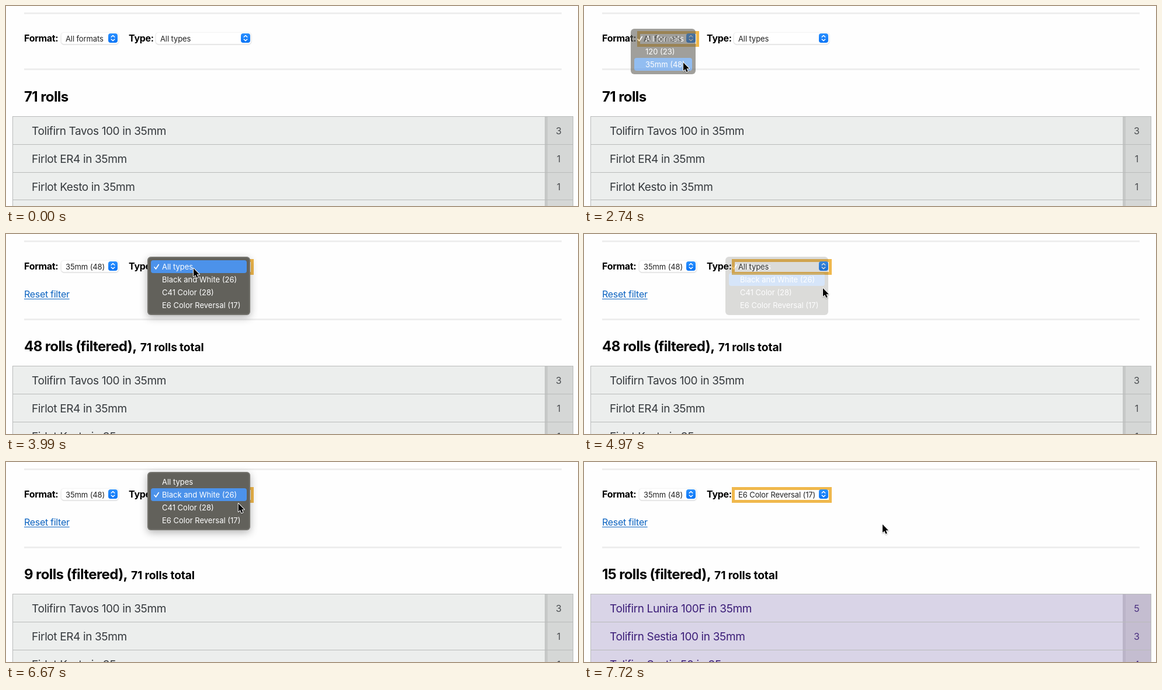
An HTML page with a canvas for the animation above (8000 ms loop, 979 by 343 pixels).

```html
<!DOCTYPE html>
<html lang="en">
<head>
<meta charset="utf-8">
<title>Film roll filter</title>
<style>
html, body { margin: 0; width: 100%; height: 100%; overflow: hidden; background: #fefefe; }
canvas { display: block; }
</style>
</head>
<body>
<canvas id="stage" width="979" height="343"></canvas>
<script>
const stage = document.getElementById('stage');
const screen2d = stage.getContext('2d');
const layer = document.createElement('canvas');
layer.width = stage.width;
layer.height = stage.height;
const layer2d = layer.getContext('2d');
let ctx = screen2d;
const LOOP = 8000;

const formats = ['All formats', '120 (23)', '35mm (48)'];
const types = ['All types', 'Black and White (26)', 'C41 Color (28)', 'E6 Color Reversal (17)'];
const greyList = {
  fill: '#eceeed', count: '#d5d7d6', edge: '#c6c8c7', ink: '#35393d', num: '#4a4d50',
  rows: [['Tolifirn Tavos 100 in 35mm', 3], ['Firlot ER4 in 35mm', 1], ['Firlot Kesto in 35mm', 1], ['', '']]
};
const purpleList = {
  fill: '#d9d4e7', count: '#c4bdd0', edge: '#bbb4c8', ink: '#3b1d78', num: '#4a2f80',
  rows: [['Tolifirn Lunira 100F in 35mm', 5], ['Tolifirn Sestia 100 in 35mm', 3], ['Tolifirn Sestia 50 in 35mm', 4]]
};

// Pointer moves: start, last step, steps, end x, end y, ease-out power
const moves = [
  [360, 530, 3, 683, 135, 1],
  [790, 1370, 8, 157, 58, 2],
  [1900, 2330, 6, 170, 97, 2],
  [2830, 2920, 2, 283, 90, 1],
  [3370, 3720, 5, 321, 59, 2],
  [4260, 4520, 4, 385, 71, 2],
  [4880, 4970, 2, 409, 93, 1],
  [5060, 5150, 2, 427, 97, 1],
  [5690, 6230, 7, 396, 56, 2],
  [6670, 7110, 6, 400, 92, 3],
  [7460, 7720, 4, 511, 107, 2]
];

// Menus: open, blink, lit again, then fade steps
const menus = [
  { items: formats, x: 80, y: 39, w: 111, checked: 0, pick: 2,
    open: 1630, off: 2570, on: 2655, fade: [[2740, .6], [2830, .22], [2920, 0]] },
  { items: types, x: 242, y: 39, w: 176, checked: 0, pick: 1,
    open: 3990, off: 4700, on: 4790, fade: [[4880, .6], [4970, .22], [5060, 0]] },
  { items: types, x: 242, y: 17, w: 176, checked: 1, pick: 3,
    open: 6410, off: 7280, on: 7370, fade: [[7460, .6], [7540, .22], [7630, 0]] }
];

function pointer(t) {
  let x = 1110, y = 82;
  for (const [t0, t1, n, ex, ey, pow] of moves) {
    if (t < t0) break;
    const step = Math.min(n, Math.floor((t - t0) / (t1 - t0) * (n - 1) + 1e-6) + 1);
    const k = 1 - Math.pow(1 - step / n, pow);
    x += (ex - x) * k;
    y += (ey - y) * k;
  }
  return { x, y };
}

function rect(x, y, w, h, color) {
  ctx.fillStyle = color;
  ctx.fillRect(x, y, w, h);
}

function round(x, y, w, h, r, color) {
  ctx.fillStyle = color;
  ctx.beginPath();
  ctx.roundRect(x, y, w, h, r);
  ctx.fill();
}

function shadow(color, blur, dy) {
  ctx.shadowColor = color;
  ctx.shadowBlur = blur;
  ctx.shadowOffsetY = dy;
}

function line(points, color, width) {
  ctx.strokeStyle = color;
  ctx.lineWidth = width;
  ctx.lineCap = ctx.lineJoin = 'round';
  ctx.beginPath();
  points.forEach(([x, y]) => ctx.lineTo(x, y));
  ctx.stroke();
}

function text(str, x, y, size, weight, color, spacing = 0, align = 'left') {
  ctx.font = `${weight} ${size}px Inter, Roboto, sans-serif`;
  ctx.letterSpacing = spacing + 'px';
  ctx.textAlign = align;
  ctx.fillStyle = color;
  ctx.fillText(str, x, y);
  return ctx.measureText(str).width;
}

function select(x, w, label, focused) {
  ctx.save();
  shadow('rgba(0,0,0,.28)', 2, .5);
  round(x + .5, 45.5, w - 1, 20, 5, '#fff');
  ctx.restore();
  if (focused) {
    rect(x - 3, 43, w + 7, 27, '#f0b84c');
    rect(x + 2, 48, w - 3, 17, '#fefefe');
  }
  text(label, x + 8, 61, 13, 400, '#222', -.1);
  const sx = x + w - 18;
  const blue = ctx.createLinearGradient(0, 47, 0, 63);
  blue.addColorStop(0, '#2a90ff');
  blue.addColorStop(1, '#0a74f5');
  round(sx, 47, 16, 16, 4, blue);
  const c = sx + 8;
  line([[c - 2.8, 53.3], [c, 50.5], [c + 2.8, 53.3]], '#fff', 1.5);
  line([[c - 2.8, 57], [c, 59.8], [c + 2.8, 57]], '#fff', 1.5);
}

function list(top, data) {
  const pitch = 47.75;
  data.rows.forEach(([name, num], i) => {
    const y = Math.round(top + i * pitch);
    rect(11, y, 960, 48, data.fill);
    rect(922, y, 49, 48, data.count);
    rect(922, y, 5, 48, data.edge);
    rect(11, y, 960, 1, '#b9bbba');
    text(name, 44, y + 32, 19, 400, data.ink, -.38);
    text(num, 946, y + 31, 16, 400, data.num, 0, 'center');
  });
  rect(11, top, 1, 343 - top, '#b9bbba');
  rect(970, top, 1, 343 - top, '#b9bbba');
}

function menuBody(m, t, solid) {
  const h = m.items.length * 22 + 12;
  ctx.save();
  if (solid) shadow('rgba(0,0,0,.3)', 14, 4);
  round(m.x, m.y, m.w, h, 6, '#62615b');
  ctx.restore();
  ctx.strokeStyle = '#85847f';
  ctx.lineWidth = 1;
  ctx.beginPath();
  ctx.roundRect(m.x + 1, m.y + 1, m.w - 2, h - 2, 5);
  if (solid) ctx.stroke();

  // The highlight trails the pointer by one step
  const row = Math.floor((pointer(t - 80).y - m.y - 6) / 22);
  const lit = t < m.off ? Math.max(row, 0) : t < m.on ? -1 : m.pick;
  if (lit >= 0) round(m.x + 6, m.y + 6 + lit * 22, m.w - 12, 22, 4, '#4c92ea');
  m.items.forEach((item, i) => text(item, m.x + 25, m.y + 22 + i * 22, 13, 400, '#fff'));
  const cy = m.y + 17 + m.checked * 22;
  line([[m.x + 12, cy + .8], [m.x + 14.5, cy + 4], [m.x + 19.3, cy - 3.5]], '#fff', 1.6);
}

// Drawn on its own layer so that the whole menu fades as one
function menu(m, t) {
  const fade = m.fade.filter(f => t >= f[0]).pop();
  const alpha = fade ? fade[1] : 1;
  if (t < m.open || !alpha) return;
  ctx = layer2d;
  ctx.clearRect(0, 0, layer.width, layer.height);
  menuBody(m, t, alpha === 1);
  ctx = screen2d;
  ctx.globalAlpha = alpha;
  ctx.drawImage(layer, 0, 0);
  ctx.globalAlpha = 1;
}

function arrow({ x, y }) {
  ctx.save();
  ctx.translate(x, y);
  ctx.beginPath();
  [[0, 0], [0, 14], [3.2, 11.2], [5.5, 16.3], [7.8, 15.3], [5.6, 10.3], [10, 10.3]]
    .forEach(([px, py]) => ctx.lineTo(px, py));
  ctx.closePath();
  shadow('rgba(0,0,0,.3)', 2, 1);
  ctx.lineJoin = 'round';
  ctx.lineWidth = 2;
  ctx.strokeStyle = '#fff';
  ctx.stroke();
  ctx.shadowColor = 'transparent';
  ctx.fillStyle = '#000';
  ctx.fill();
  ctx.restore();
}

function draw(t) {
  const filtered = t >= 3100;
  rect(0, 0, 979, 343, '#fefefe');
  rect(31, 11, 920, 3, '#eee');
  rect(31, filtered ? 145 : 107, 920, 3, '#eee');

  text('Format:', 31, 61, 16, 700, '#000', -.3);
  text('Type:', 210, 61, 16, 700, '#000', -.3);
  select(94, 99, formats[t >= 2920 ? 2 : 0], t >= 1630 && t < 3990);
  select(256, 164, types[t >= 7630 ? 3 : t >= 5060 ? 1 : 0], t >= 3990);

  if (filtered) {
    const w = text('Reset filter', 31, 109, 16, 400, '#0b63c0', -.3);
    rect(31, 111, w, 1, '#0b63c0');
    const count = t >= 7720 ? 15 : t >= 5150 ? 9 : 48;
    const head = text(count + ' rolls (filtered),', 31, 201, 24, 700, '#000', -.6);
    text('71 rolls total', 31 + head + 6, 201, 19.2, 700, '#000', -.15);
  } else {
    text('71 rolls', 31, 164, 24, 700, '#000', -.6);
  }
  list(filtered ? 226 : 189, t >= 7720 ? purpleList : greyList);
  menus.forEach(m => menu(m, t));
  arrow(pointer(t));
}

const start = performance.now();
function tick(now) {
  draw(Math.max(0, now - start) % LOOP);
  requestAnimationFrame(tick);
}
draw(0);
requestAnimationFrame(tick);
</script>
</body>
</html>
```
